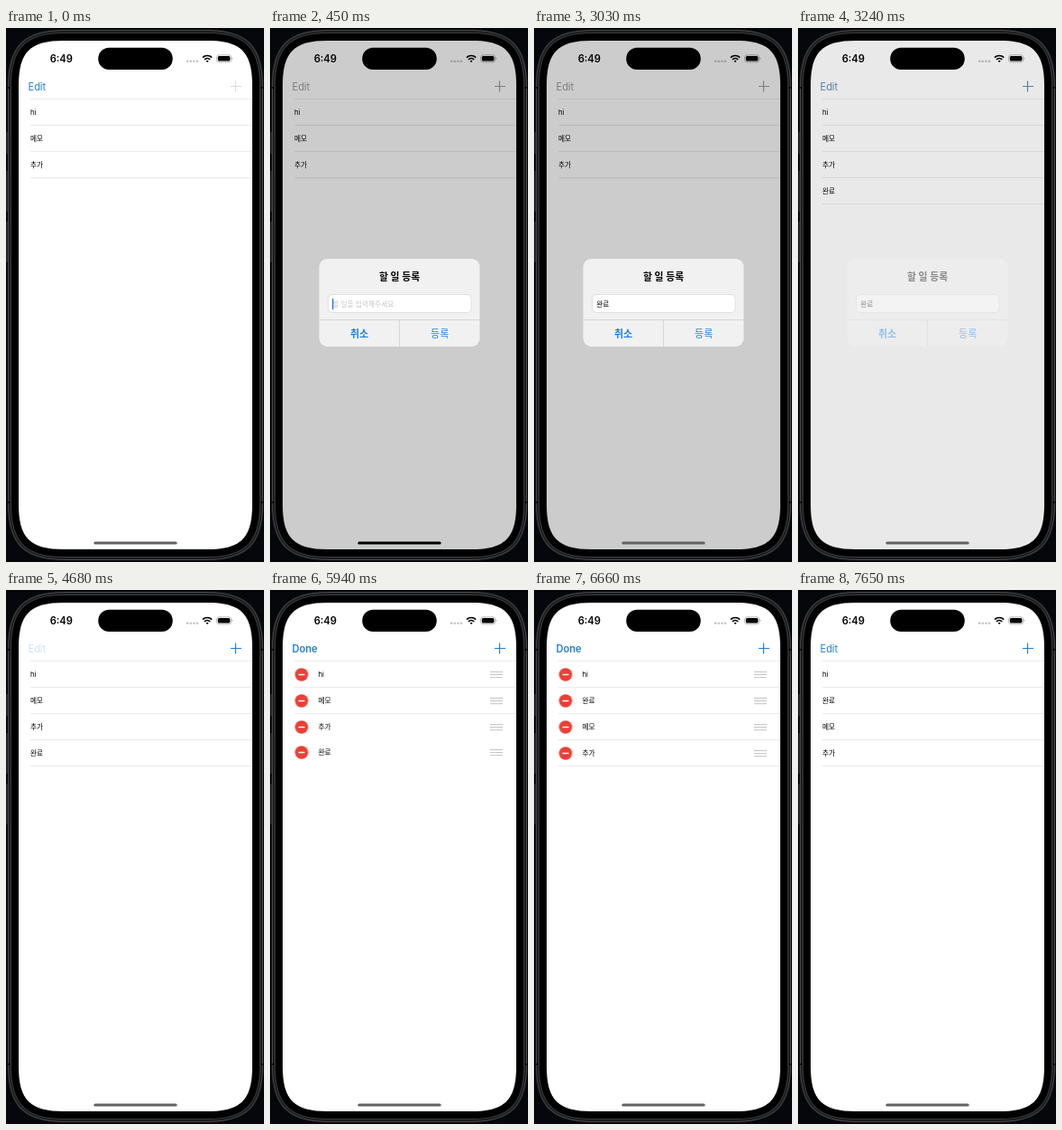
An HTML page that plays this animation: 286x590 px, repeating every 8 s.

```html
<!DOCTYPE html>
<html lang="ko">
<head>
<meta charset="utf-8">
<title>Memo list</title>
<style>
html, body { margin: 0; width: 100%; height: 100%; overflow: hidden; background: #05070b; }
svg { display: block; width: 100%; height: 100%; font-family: Inter, 'Noto Sans CJK KR', 'Noto Sans CJK', sans-serif; }

/* Every track shares one 8 s clock: 1% is 80 ms */
.dim, .alert, .edit, .done, .plus, .home, .indent, .minus, .grip, .memo, .add,
.new, .lift, .line, .popup, .typed, .caret, .blink { animation: 8s linear infinite; }

.nav { font-size: 11.2px; letter-spacing: -.15px; fill: #2680d0; }
.cell { font-size: 7.7px; }
.button { font-size: 11px; fill: #1c82e2; text-anchor: middle; }
.mid { text-anchor: middle; }
.bold { font-weight: 600; }

.dim { animation-name: dim; }
@keyframes dim {
  0%, .3% { opacity: 0; animation-timing-function: ease-out; }
  5.6%, 37.9% { opacity: 1; animation-timing-function: ease-in-out; }
  42.7%, 100% { opacity: 0; }
}
.alert { animation-name: alert; transform-origin: 143.5px 303.5px; }
@keyframes alert {
  0%, .3% { opacity: 0; transform: scale(1.17); animation-timing-function: cubic-bezier(.2, .7, .3, 1); }
  5.6%, 37.9% { opacity: 1; transform: none; animation-timing-function: ease-in-out; }
  42.7%, 100% { opacity: 0; transform: none; }
}
.edit { animation-name: edit; }
@keyframes edit {
  0%, .3% { fill: #2680d0; opacity: 1; }
  5.6%, 37.9% { fill: #9d9d9d; opacity: 1; }
  42.7%, 58.45% { fill: #2680d0; opacity: 1; }
  58.5% { fill: #2680d0; opacity: .22; }
  60.5%, 91.8% { fill: #2680d0; opacity: 0; }
  95.6%, 100% { fill: #2680d0; opacity: 1; }
}
.done { animation-name: done; }
@keyframes done {
  0%, 58.7% { opacity: 0; }
  62.6%, 91.45% { opacity: 1; }
  91.5% { opacity: .22; }
  93.5%, 100% { opacity: 0; }
}
.plus { animation-name: plus; }
@keyframes plus {
  0%, .3% { stroke: #d8dcee; }
  5.6%, 37.9% { stroke: #9d9d9d; }
  42.7%, 100% { stroke: #2680d0; }
}
.home { animation-name: home; }
@keyframes home {
  0%, .3% { fill: #626262; }
  5.6%, 35.5% { fill: #000; }
  37.5%, 100% { fill: #626262; }
}

/* Edit mode */
.indent { animation-name: indent; }
@keyframes indent {
  0%, 58.5% { transform: none; animation-timing-function: ease-in-out; }
  62.6%, 91.5% { transform: translateX(26.5px); animation-timing-function: ease-in-out; }
  95.6%, 100% { transform: none; }
}
.minus { animation-name: show; }
@keyframes show {
  0%, 58.5% { opacity: 0; }
  62.6%, 91.5% { opacity: 1; }
  95.6%, 100% { opacity: 0; }
}
.grip { animation-name: grip; }
@keyframes grip {
  0%, 58.5% { opacity: 0; transform: translateX(28px); animation-timing-function: ease-in-out; }
  62.6%, 91.5% { opacity: 1; transform: none; animation-timing-function: ease-in-out; }
  95.6%, 100% { opacity: 0; transform: translateX(28px); }
}

/* Reordering */
.memo { animation-name: memo; }
@keyframes memo {
  0%, 79.9% { transform: none; animation-timing-function: ease-in-out; }
  82.4%, 100% { transform: translateY(29px); }
}
.add { animation-name: add; }
@keyframes add {
  0%, 77% { transform: none; animation-timing-function: ease-in-out; }
  79.7%, 100% { transform: translateY(29px); }
}
.new { animation-name: new; }
@keyframes new {
  0%, 38.2% { opacity: 0; transform: none; }
  38.25%, 74.2% { opacity: 1; transform: none; }
  74.25% { opacity: 1; transform: translateY(-1px); }
  76.1% { opacity: 1; transform: translateY(-9px); }
  79.125% { opacity: 1; transform: translateY(-36px); }
  81.4% { opacity: 1; transform: translateY(-54px); }
  83.25%, 100% { opacity: 1; transform: translateY(-58px); }
}
.lift { animation-name: lift; }
@keyframes lift {
  0%, 74.2% { opacity: 0; }
  74.25%, 82.8% { opacity: 1; }
  83.25%, 100% { opacity: 0; }
}
.line { animation-name: line; }
@keyframes line {
  0%, 74.2% { opacity: 1; }
  74.25%, 82.8% { opacity: 0; }
  83.25%, 100% { opacity: 1; }
}

/* Typing */
.popup { animation-name: popup; }
@keyframes popup {
  0%, 15% { opacity: 0; }
  15.75%, 18.75% { opacity: 1; }
  22.1%, 100% { opacity: 0; }
}
.typed { animation-name: typed; animation-timing-function: step-end; }
@keyframes typed {
  0% { transform: none; }
  7.5% { transform: translateY(-20px); }
  8.25% { transform: translateY(-40px); }
  13.5% { transform: none; }
  18% { transform: translateY(-60px); }
  19.875% { transform: translateY(-80px); }
  21.375% { transform: translateY(-100px); }
  25.125% { transform: translateY(-120px); }
  25.875%, 100% { transform: translateY(-140px); }
}
.caret { animation-name: caret; animation-timing-function: step-end; }
@keyframes caret {
  0% { transform: none; }
  7.5% { transform: translateX(5px); }
  8.25% { transform: translateX(10px); }
  13.5% { transform: none; }
  18% { transform: translateX(8px); }
  25.875%, 100% { transform: translateX(15px); }
}
.blink { animation-name: blink; }
@keyframes blink {
  0%, 31.5% { opacity: 1; }
  33%, 100% { opacity: 0; }
}
</style>
</head>
<body>
<svg viewBox="0 0 286 590">
  <defs>
    <path id="glass" d="M64 14H223C260.5 14 273 26.5 273 64V526C273 563.5 260.5 576 223 576H64C26.5 576 14 563.5 14 526V64C14 26.5 26.5 14 64 14z"/>
    <clipPath id="screen"><use href="#glass"/></clipPath>
    <clipPath id="field"><rect x="66" y="296" width="155" height="17"/></clipPath>
    <g id="delete">
      <circle cx="8.5" cy=".5" r="7.3" fill="#ea4035"/>
      <rect x="5" y="-.2" width="7" height="1.4" rx=".5" fill="#fff"/>
    </g>
    <path id="bars" d="M244-2.5h14M244 .6h14M244 3.7h14" stroke="#c2c2c5"/>
    <path id="rules" d="M27-14.5H273M27 14.5H273" stroke="#ebebed"/>
  </defs>

  <!-- Phone body: the glass outline, widened in layers -->
  <g fill="#202124">
    <rect y="115" width="3" height="24"/>
    <rect y="158" width="3" height="45"/>
    <rect y="214" width="3" height="45"/>
  </g>
  <use href="#glass" stroke="#47484a" stroke-width="24"/>
  <use href="#glass" stroke="#1d1e20" stroke-width="22"/>
  <use href="#glass" stroke="#38393b" stroke-width="18"/>
  <use href="#glass" stroke="#000" stroke-width="16"/>
  <path d="M2 66h3M282 66h3M2 524h3M282 524h3" stroke="#0c0d0f" stroke-width="2"/>

  <g clip-path="url(#screen)">
    <rect x="14" y="14" width="259" height="562" fill="#fff"/>

    <!-- Status bar -->
    <text class="bold" x="61.3" y="38.1" font-size="11.2" text-anchor="middle">6:49</text>
    <g fill="#c3c3c5">
      <circle cx="201.2" cy="36.8" r="1.3"/><circle cx="204.8" cy="36.8" r="1.3"/>
      <circle cx="208.4" cy="36.8" r="1.3"/><circle cx="212" cy="36.8" r="1.3"/>
    </g>
    <g fill="none" stroke="#000" stroke-width="1.7">
      <path d="M218 32.6a7.2 7.2 0 0 1 10.2 0M220 34.9a4.4 4.4 0 0 1 6.2 0"/>
      <path d="M221.6 36.4a2.2 2.2 0 0 1 3 0L223.1 38z" fill="#000" stroke="none"/>
    </g>
    <rect x="233.6" y="29.8" width="16" height="8" rx="2.5" fill="none" stroke="#a9a9aa" stroke-width=".8"/>
    <rect x="234.8" y="31" width="13.6" height="5.6" rx="1.5"/>
    <path d="M250.5 32.4v2.8q1-.4 1-1.4t-1-1.4z" fill="#a9a9aa"/>

    <!-- Navigation -->
    <text class="nav edit" x="24.6" y="68.7">Edit</text>
    <text class="nav bold done" x="24.6" y="68.7">Done</text>
    <path class="plus" d="M249 64.5h12M254.5 58.5v12" stroke-width="1.2"/>

    <!-- Rows -->
    <g class="cell">
      <g transform="translate(0 93)">
        <use href="#rules"/>
        <g class="indent"><use class="minus" href="#delete"/><text x="27" y="3">hi</text></g>
        <use class="grip" href="#bars"/>
      </g>
      <g transform="translate(0 122)"><g class="memo">
        <use href="#rules"/>
        <g class="indent"><use class="minus" href="#delete"/><text x="27" y="3">메모</text></g>
        <use class="grip" href="#bars"/>
      </g></g>
      <g transform="translate(0 151)"><g class="add">
        <use href="#rules"/>
        <g class="indent"><use class="minus" href="#delete"/><text x="27" y="3">추가</text></g>
        <use class="grip" href="#bars"/>
      </g></g>
      <g transform="translate(0 180)"><g class="new">
        <rect class="lift" x="14" y="-15" width="259" height="30" fill="#fff"/>
        <use class="line" href="#rules"/>
        <g class="indent"><use class="minus" href="#delete"/><text x="27" y="3">완료</text></g>
        <use class="grip" href="#bars"/>
      </g></g>
    </g>

    <rect class="dim" x="14" y="14" width="259" height="562" fill="#000" fill-opacity=".2"/>
    <rect x="102.2" y="21.8" width="82.6" height="24.2" rx="12.1"/>
    <rect class="home" x="97.3" y="567.4" width="92.4" height="3" rx="1.5"/>

    <!-- Alert -->
    <g class="alert">
      <rect x="54.5" y="255" width="178" height="97" rx="9" fill="#f1f1f1"/>
      <path d="M54.5 322.5h178M143.5 322.5V352" stroke="#d6d6d7"/>
      <text class="mid bold" x="143.5" y="278.6" font-size="10.8">할 일 등록</text>
      <rect x="64.5" y="294.5" width="158.7" height="20" rx="4.8" fill="#fff" stroke="#dededf"/>
      <g class="cell" clip-path="url(#field)">
        <g class="typed">
          <text x="69.3" y="308" fill="#c4c4c6">할 일을 입력해주세요</text>
          <text x="69.3" y="328">d</text>
          <text x="69.3" y="348">dh</text>
          <text x="69.3" y="368">ㅇ</text>
          <text x="69.3" y="388">오</text>
          <text x="69.3" y="408">와</text>
          <text x="69.3" y="428">완</text>
          <text x="69.3" y="448">완료</text>
        </g>
      </g>
      <g class="caret"><rect class="blink" x="69" y="299" width="1.3" height="12" fill="#2b74d8"/></g>
      <text class="button bold" x="99" y="342.2">취소</text>
      <text class="button" x="188.2" y="342.2">등록</text>
    </g>

    <!-- Input language -->
    <g class="popup">
      <rect x="94.5" y="263.5" width="98.5" height="67" rx="6" fill="#000" fill-opacity=".1"/>
      <rect x="94.5" y="262" width="98" height="66.5" rx="5.5" fill="#000" fill-opacity=".16"/>
      <rect x="95" y="262" width="97" height="66" rx="5" fill="#fdfdfd"/>
      <path d="M95 295h97v28a5 5 0 0 1-5 5h-87a5 5 0 0 1-5-5z" fill="#1a86fb"/>
      <text class="mid" x="143" y="283.2" font-size="11.3">English (US)</text>
      <text class="mid" x="143" y="315.8" font-size="11" fill="#fff">한국어</text>
    </g>
  </g>
</svg>
</body>
</html>
```
